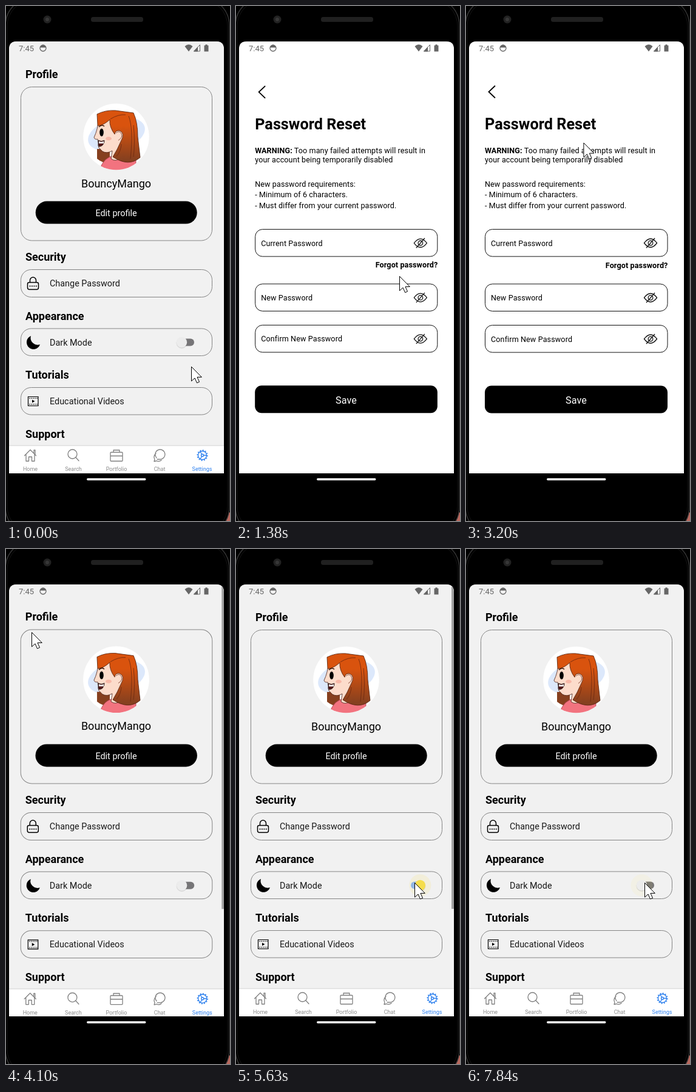
Animation, 369 px wide and 843 px high, one loop 8 s. Source, as an HTML page:

```html
<!DOCTYPE html>
<html lang="en">
<head>
<meta charset="utf-8">
<title>Settings demo</title>
<style>
html, body { margin: 0; width: 100%; height: 100%; overflow: hidden; background: #000; }
svg { display: block; width: 100%; height: 100%; font-family: Roboto, sans-serif; }
#settings { --bg: #f1f1f1; --ink: #000; --line: #858585; font-size: 14.4px; }
#settings.dark { --bg: #323232; --ink: #fff; --line: #8a8a8a; }
#page { fill: var(--bg); }
.ink { fill: var(--ink); }
.row { fill: var(--ink); fill-opacity: .9; }
.box { fill: none; stroke: var(--line); }
.icon { fill: none; stroke: var(--ink); stroke-width: 1.5; stroke-linecap: round; }
.head { font-size: 18px; font-weight: 700; }
.mid { text-anchor: middle; }
.tabs { fill: none; stroke: #808080; stroke-width: 1.3; stroke-linejoin: round; stroke-linecap: round; }
.tabs text { font-size: 9px; fill: #8a8a8a; stroke: none; text-anchor: middle; }
.tabs .on { stroke: #2d80ee; }
.tabs .on text { fill: #2d80ee; }
#reset { font-size: 12.6px; letter-spacing: .1px; }
#reset .field rect, .eye { fill: none; stroke: #111; }
.eye { stroke-width: 1.3; }
</style>
</head>
<body>
<svg viewBox="0 0 369 843">
  <defs>
    <clipPath id="screen"><path d="M5 765V71q0-13 13-13H346q13 0 13 13V765z"/></clipPath>
    <clipPath id="round"><circle cx="181.5" cy="214" r="54.3"/></clipPath>
    <linearGradient id="hair" x1="0" y1="0" x2="0" y2="1">
      <stop offset=".3" stop-color="#d9530e"/><stop offset=".95" stop-color="#86401f"/>
    </linearGradient>
    <g id="eye" class="eye">
      <path d="M-10.500 0Q0-14 10.500 0Q0 14-10.500 0zM-7 8L7-8"/><circle r="3.800"/>
    </g>
  </defs>

  <!-- phone body -->
  <path d="M345 829H369V843H345z" fill="#b8695f"/>
  <rect x="-1" y="-14" width="369" height="880" rx="46" stroke="#363636" stroke-width="1.500"/>
  <rect x="2" y="-10" width="363" height="872" rx="43" fill="none" stroke="#151515"/>
  <circle cx="68" cy="22" r="6.500" fill="#222"/><circle cx="68" cy="22" r="3" fill="#373737"/>
  <rect x="140" y="18" width="86" height="8" rx="3.500" fill="#202020"/>
  <rect x="133" y="773" width="97.500" height="3.500" rx="1.700" fill="#f4f4f4"/>

  <g clip-path="url(#screen)">
    <path d="M5 58H359V765H5z" fill="#f1f1f1"/>

    <g id="settings">
      <path d="M5 58H359V765H5z" fill="#f1f1f1"/>
      <path id="page" d="M5 85H359V765H5z"/>
      <g class="ink head">
        <text x="32" y="117.500">Profile</text>
        <text x="32" y="417">Security</text>
        <text x="32" y="513.500">Appearance</text>
        <text x="32" y="610">Tutorials</text>
        <text x="32" y="706.500">Support</text>
      </g>
      <rect class="box" x="24.500" y="132.500" width="315" height="251.500" rx="18"/>

      <!-- avatar -->
      <circle cx="181.500" cy="214" r="54.300" fill="#fff"/>
      <g clip-path="url(#round)" stroke-linejoin="round">
        <ellipse cx="182" cy="210" rx="48" ry="26" fill="#dce8fb" transform="rotate(-15 182 210)"/>
        <path d="M150 234h21v24q-13-1-21-8z" fill="#86401f"/>
        <path d="M154 270Q160 246 180 245L214 252V270z" fill="#f2737f" stroke="#a33a48" stroke-width=".8"/>
        <path d="M153 184Q151 203 145 215q1 4 6 3l1 6q-1 4 1 8l6 6q7 4 16-1l-2 13q8 6 17-2l6-32-12-34z" fill="#fcdccb" stroke="#4a2218" stroke-width=".8"/>
        <path d="M150 177Q164 170 180 171L210 175Q217 190 217 214L221 248Q202 264 176 247Q184 234 189 222Q197 208 187 204Q180 203 179 210Q170 198 171 186Q160 196 151 196z" fill="url(#hair)" stroke="#4f1d0b" stroke-width=".8"/>
        <path d="M172 185q13-8 25-7M202 180q8 20 3 70M210 195q3 28 0 52M190 226q-1 13-8 20" fill="none" stroke="#6b2810" stroke-width=".8"/>
        <path d="M181 208q6-5 9 1t-5 11" fill="#fcdccb" stroke="#7b3a28" stroke-width=".8"/>
        <ellipse cx="157.500" cy="207" rx="3.300" ry="6.500"/>
        <path d="M153 198q5-5 9-1" fill="none" stroke="#401909" stroke-width="1.500"/>
        <path d="M152 220q5 3 10 0-1 10-9 10z" fill="#5a1a1a" stroke="#201010"/>
        <path d="M153 221q4 3 8 0v4h-8z" fill="#fff"/>
        <ellipse cx="169" cy="217" rx="5" ry="3" fill="#f7b9a8"/>
      </g>

      <text class="ink mid" x="181.500" y="296.500" font-size="18">BouncyMango</text>
      <rect x="48.700" y="319.600" width="266" height="37" rx="18.500"/>
      <text class="mid" x="181.500" y="344" fill="#fff">Edit profile</text>

      <g id="password">
        <rect class="box" x="24.500" y="431.500" width="315" height="45" rx="17"/>
        <g class="icon">
          <path d="M39.500 452v-3a5 5 0 0 1 10 0v3M38 452.500H51a2.500 2.500 0 0 1 2.500 2.500v6a3 3 0 0 1-3 3H38.500a3 3 0 0 1-3-3V455a2.500 2.500 0 0 1 2.500-2.500"/>
          <path d="M39.500 458.500H50" stroke-dasharray=".1 3.300" stroke-width="1.900"/>
        </g>
        <text class="row" x="72" y="459">Change Password</text>
      </g>

      <rect class="box" x="24.500" y="528" width="315" height="44.500" rx="17"/>
      <path class="ink" d="M41 540A11.300 11.300 0 1 0 56 554A11.500 11.500 0 0 1 41 540"/>
      <text class="row" x="72" y="556">Dark Mode</text>
      <rect id="track" x="288" y="544.500" width="22" height="12" rx="6"/>
      <circle id="ripple"/>
      <circle id="shade" cy="551.500" r="9" fill="#000" opacity=".13"/>
      <circle id="thumb" cy="550.500" r="8.700"/>

      <rect class="box" x="24.500" y="624.500" width="315" height="44.500" rx="17"/>
      <g class="icon" style="stroke-width:1.200">
        <path d="M36.500 639.500H53V654.500H36.500z"/>
        <path d="M38.500 642H52M38.500 652H52" stroke-dasharray="1 2" stroke-linecap="butt" stroke-width="2"/>
      </g>
      <path class="ink" d="M43 644.500l4.500 2.500-4.500 2.500z"/>
      <text class="row" x="72" y="652">Educational Videos</text>

      <path id="scrollbar" d="M355 62H359V589H355z" fill="#a2a2a2"/>

      <g class="tabs">
        <path d="M5 719.500H359V765H5z" fill="#fff" stroke="none"/>
        <path d="M5 719.500H359" stroke="#dedede"/>
        <g><path d="M30.500 736L40 726.500 49.500 736M33 734V745H37.500V738H42.500V745H47V734M46 732V727H48V734"/><text x="40" y="761">Home</text></g>
        <g><circle cx="109.500" cy="733.500" r="7.500"/><path d="M115 739l5 5.500"/><text x="111" y="761">Search</text></g>
        <g><path d="M173 730.500H191q1 0 1 1V744q0 1-1 1H173q-1 0-1-1V731.500q0-1 1-1M177 730V727H187V730M172 736.500H192"/><text x="182" y="761">Portfolio</text></g>
        <g><path d="M248 739.500a8 8 0 1 1 5 2.500l-4 0M247 732q-5 5-2 10l-1 3.500 4-1q4 2 8-1"/><text x="253" y="761">Chat</text></g>
        <g class="on"><circle cx="323.500" cy="735.500" r="7"/><circle cx="323.500" cy="735.500" r="8.300" stroke-width="1.700" stroke-dasharray="1.800 2.546" stroke-linecap="butt"/><circle cx="323.500" cy="735.500" r="2"/><path d="M325.500 735.500H330M322.500 733.700L320 729.500M322.500 737.300L320 741.500"/><text x="323" y="761">Settings</text></g>
      </g>
    </g>

    <g id="reset">
      <path d="M5 58H359V765H5z" fill="#fff"/>
      <path d="M48 130.500L37.500 140.500 48 150.500" fill="none" stroke="#000" stroke-width="1.800"/>
      <text x="31" y="202" font-size="25.300" font-weight="700" letter-spacing="0">Password Reset</text>
      <text x="31" y="240.500"><tspan font-weight="700">WARNING:</tspan> Too many failed attempts will result in</text>
      <text x="31" y="256">your account being temporarily disabled</text>
      <text x="31" y="295.500">New password requirements:</text>
      <text x="31" y="313">- Minimum of 6 characters.</text>
      <text x="31" y="330.500">- Must differ from your current password.</text>
      <g class="field">
        <rect x="31.500" y="365.500" width="300.500" height="44.500" rx="12"/>
        <text x="41" y="392.500">Current Password</text><use href="#eye" x="304" y="388"/>
        <rect x="31.500" y="455" width="300.500" height="44.500" rx="12"/>
        <text x="41" y="482">New Password</text><use href="#eye" x="304" y="477.500"/>
        <rect x="31.500" y="522.500" width="300.500" height="44.500" rx="12"/>
        <text x="41" y="549.500">Confirm New Password</text><use href="#eye" x="304" y="545"/>
      </g>
      <text x="332.500" y="428.500" font-weight="700" text-anchor="end">Forgot password?</text>
      <rect x="31" y="621.500" width="301" height="45" rx="11"/>
      <text class="mid" x="181.500" y="651" fill="#fff" font-size="16.200">Save</text>
    </g>

    <!-- status bar -->
    <g fill="#666">
      <text x="21" y="73.500" font-size="13">7:45</text>
      <circle cx="61" cy="69" r="5" fill="none" stroke="#666" stroke-width="1.300"/>
      <path d="M56.500 68a4.500 4.500 0 0 1 9 0z"/>
      <path d="M294.500 66Q301 60 307.500 66L301 74.500z"/>
      <path d="M309.500 74L319.500 63.500V74z" fill="none" stroke="#666"/><path d="M309 74.500L316 67V74.500z"/>
      <path d="M326.500 64.500H328.500V63H331.500V64.500H333.500V74.500H326.500z"/>
    </g>
  </g>

  <path id="cursor" d="M.5.5V24L6 19 9.500 27 13.500 25.300 10 17.500H17.300z" fill="#fff" stroke="#000"/>
</svg>
<script>
const LOOP = 8000;
const OPEN = 1059, CLOSE = 3820, SLIDE = 400;
const DARK_ON = 5700, DARK_OFF = 7140;

const $ = id => document.getElementById(id);
const clamp = v => Math.min(1, Math.max(0, v));
const ramp = (t, from, to) => clamp((t - from) / (to - from));
const inOut = v => v < .5 ? 2 * v * v : 1 - 2 * (1 - v) ** 2;
const set = (id, attrs) => { for (const k in attrs) $(id).setAttribute(k, attrs[k]); };

// cubic-bezier(.35, .45, 0, 1)
function zoomEase(x) {
  let lo = 0, hi = 1, s = .5;
  for (let i = 0; i < 24; i++) {
    s = (lo + hi) / 2;
    if (1.05 * s * (1 - s) ** 2 + s ** 3 < x) lo = s; else hi = s;
  }
  return x <= 0 ? 0 : x >= 1 ? 1 : 1.35 * s * (1 - s) ** 2 + 3 * s * s * (1 - s) + s ** 3;
}

// time, x, y
const path = [
  [0, 305, 590], [30, 305, 590], [90, 298, 558], [180, 278, 476], [270, 269, 442],
  [1440, 269, 442], [1600, 276, 490], [1800, 292, 554], [1950, 306, 585],
  [2220, 306, 585], [2260, 306, 578], [2400, 190, 500], [2580, 1, 420], [2720, 90, 322],
  [2900, 334, 335], [3050, 326, 371], [3200, 194, 224], [3400, 75, 132], [3600, 42, 136],
  [4220, 42, 136], [4370, 115, 220], [4540, 252, 389], [4575, 262, 425],
  [4700, 284, 518], [4880, 294, 546], [LOOP, 294, 546]
];

function cursorAt(t) {
  const i = path.findIndex(p => p[0] > t), a = path[i - 1], b = path[i];
  const k = ramp(t, a[0], b[0]);
  return [1, 2].map(n => a[n] + (b[n] - a[n]) * k);
}

function zoom(id, scale, opacity) {
  set(id, { transform: `translate(182 411) scale(${scale}) translate(-182 -411)`, opacity });
}

function drawSwitch(t) {
  const on = inOut(ramp(t, 5470, 5720)) - inOut(ramp(t, 6910, 7160));
  const x = 289.5 + 18.5 * on, lit = t >= DARK_ON && t < DARK_OFF;
  $('settings').classList.toggle('dark', lit);
  set('track', { fill: on > .5 ? '#81b0ff' : '#767577' });
  set('thumb', { cx: x, fill: on > .5 ? '#f5dd4b' : '#ececec' });
  set('shade', { cx: x });
  const early = t < 5470;
  set('ripple', {
    cx: early ? 294 : x, cy: early ? 546 : 550.5, r: 18,
    fill: early ? '#888' : '#f5dd4b',
    opacity: t < 5310 ? 0 : early ? .08
      : t < 6910 ? .15 * (1 - ramp(t, 5600, 6260))
      : .18 - .11 * ramp(t, 7160, 7840)
  });
}

function draw(t) {
  const closing = t >= CLOSE;
  const p = closing ? 1 - zoomEase(ramp(t, CLOSE, CLOSE + SLIDE)) : zoomEase(ramp(t, OPEN, OPEN + SLIDE));
  zoom('settings', 1 + .075 * p, 1 - ramp(p, .2075, 1));
  zoom('reset', closing ? .925 + .075 * p : .85 + .15 * p, ramp(p, .75, .875));
  set('password', { opacity: 1 - .8 * (inOut(ramp(t, 670, 780)) - inOut(ramp(t, 1040, 1290))) });
  set('scrollbar', { opacity: closing && t < DARK_ON ? 1 : 0 });
  drawSwitch(t);
  set('cursor', { transform: `translate(${cursorAt(t)})` });
}

const start = performance.now();
function tick() {
  draw((performance.now() - start) % LOOP);
  requestAnimationFrame(tick);
}
tick();
</script>
</body>
</html>
```
